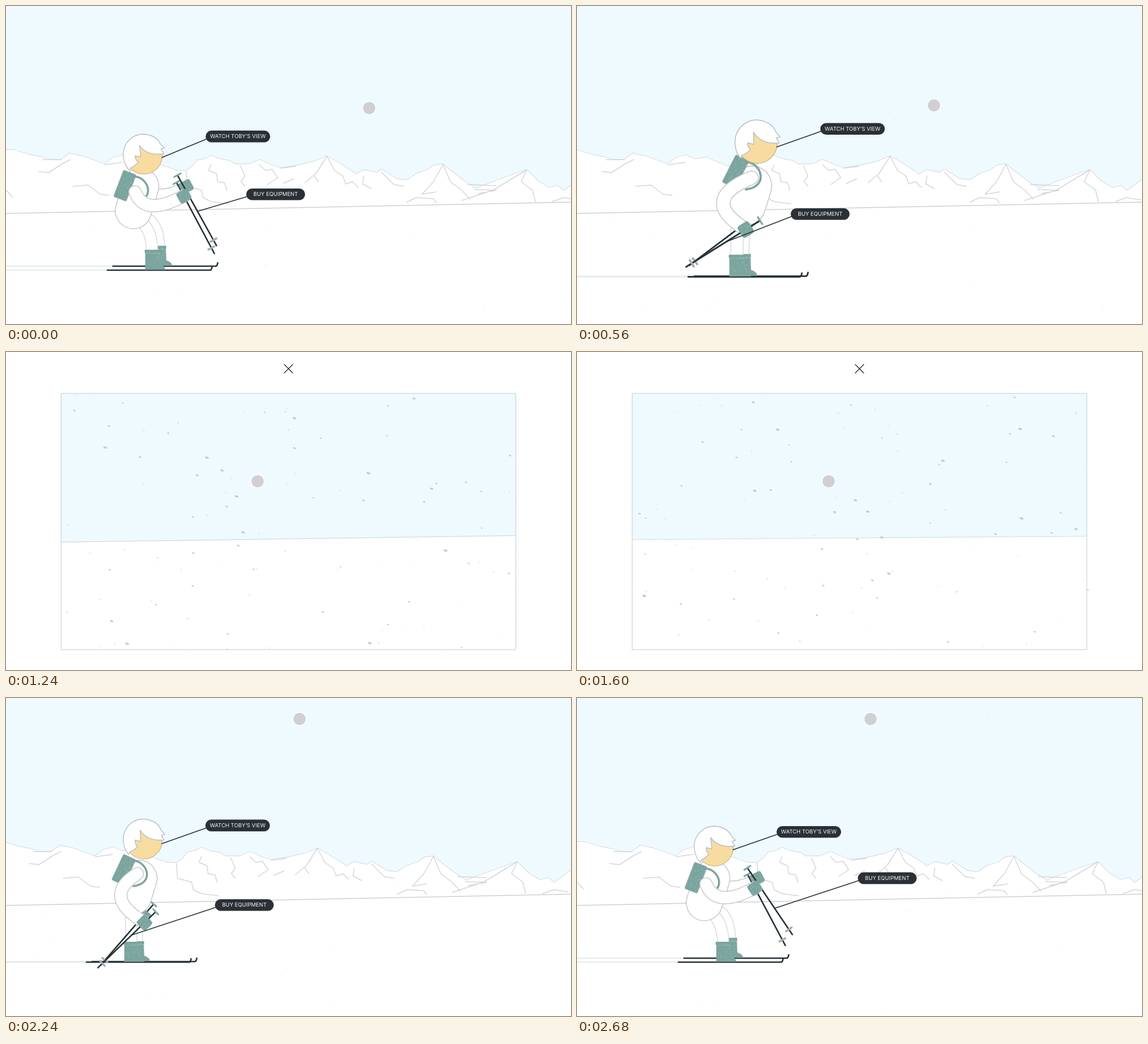
Recreate the animation shown at these times as an HTML page with a canvas. Size 998 by 561 pixels, loop 2720 ms.

```html
<!DOCTYPE html>
<html lang="en">
<head>
<meta charset="utf-8">
<title>Ski trek</title>
<style>
html, body { margin: 0; width: 100%; height: 100%; overflow: hidden; background: #fff; }
canvas { display: block; width: 998px; height: 561px; }
</style>
</head>
<body>
<canvas id="stage" width="998" height="561"></canvas>
<script>
const ctx = document.getElementById('stage').getContext('2d');
const W = 998, H = 561, LOOP = 2720, STRIDE = 1120, TAU = Math.PI * 2, DEG = Math.PI / 180;
const SKY = '#eefaff', INK = '#263238', PILL = '#2b3036', GREEN = '#7ba59f';
const LINE = '#d3d6d8', COAT = '#c6c9cb', SKIN = '#f8dc9f', FLAKE = '#c6cbcc';

// One stride of the skier, sampled at these phases.
const PHASES = [0, 280, 560, 680, 920, 1120];
const STRIDE_TRACKS = {
  crouch: [1, 0, 0, 0, 0, 1],
  headY: [262, 245.5, 247, 249.5, 252, 262],
  headTilt: [-1, 7, 4, 3, -1, 0],
  boot: [258, 207, 210, 221, 225, 258],
  legTop: [234, 207, 210, 220, 226, 234],
  shoulderX: [228, 230, 234, 232, 229, 228],
  shoulderY: [328, 301, 305, 310, 316, 328],
  elbowX: [258, 187, 188, 203, 206, 258],
  elbowY: [352, 344, 344, 352, 357, 352],
  handX: [314, 223, 225, 245, 269, 314],
  handY: [335, 393, 389, 396, 388, 335],
  packX: [210, 206, 208, 208, 207, 210],
  packY: [317, 297, 295, 303, 304, 317],
  packTilt: [21, 30, 27, 25, 24, 21],
  nearPole: [61, 159, 148, 136, 120, 56],
  farPole: [62, 164, 143, 131, 115, 62],
  farX: [0, 1, 0, -2, -3, 0],
  farY: [0, -13, -11, -12, -12, 0],
  tagAt: [46, 46, 38, 32, 30, 59]
};

// Slow drift and zoom of the skier and the lag of the tags, over the loop.
const TIMES = [0, 280, 560, 920, 1300, 2240, 2720];
const LOOP_TRACKS = {
  shift: [0, 54, 75, 15, 0, 0, 0],
  zoom: [1, 1.04, 1.085, 1.085, 1, 1, 1],
  viewX: [77, 85, 77, 77, 77, 77, 77],
  viewY: [-37, -32, -32, -32, -32, -32, -31.5],
  buyX: [86, 140, 114, 140, 147, 147, 147],
  buyY: [-30, -44, -49, -50, -53, -53, -53]
};

const SKYLINE = [-30,250, 0,254, 14,254, 40,262, 60,266, 78,271, 96,272, 112,260, 135,265,
  155,272, 174,279, 188,268, 206,263, 222,270, 243,267, 275,281, 300,290, 318,291, 330,282,
  338,272, 350,270, 362,264, 378,270, 395,273, 404,279, 430,279, 448,271, 470,281, 485,286,
  520,280, 545,274, 567,265, 585,275, 612,292, 618,297, 632,289, 655,294, 663,288, 690,305,
  708,307, 725,296, 745,289, 756,281, 772,279, 785,290, 810,309, 830,322, 850,314, 885,301,
  920,289, 940,309, 960,321, 975,317, 985,326, 1015,304, 1050,285];
const RIDGES = new Path2D(`M58 292L75 294L100 278L114 271M118 318L145 316L166 332L182 334
  M0 325L12 337M65 271L98 271M175 280L205 276M318 292L320 318L345 325L348 338L362 345L392 349
  M362 280L358 290L372 296L374 310L386 312L390 325M414 282L422 300L415 310L422 318
  M448 280L458 290L470 288L480 303L462 315M485 286L512 283M508 305L490 313
  M567 265L548 295L528 312M545 300L552 310M567 265L580 290L595 300L600 314L612 310L622 320
  M632 300L630 314L645 322M663 293L685 315L702 318M772 279L755 310L735 332L760 328
  M772 280L785 310L805 325L820 341M815 315L865 317M828 324L866 325L834 331
  M805 343L860 325L920 289L910 310L930 325L935 345M708 346L725 338L755 340L760 347
  M965 345L985 338L1010 342`);
const HAIR = new Path2D(`M36 -1C22 1 4 0 -7 -16C-6 -6 -5 -1 -5 4L-15 2Q-15 9 -10 13Q-15 20 -23 23
  L-25 28C-33 20 -36 8 -36 -1C-35 -23 -18 -36 0 -36C14 -35 25 -29 30 -18L37 -11L31 -9Z`);

const clamp01 = v => Math.min(1, Math.max(0, v));
const ramp = (t, from, to) => {
  const u = clamp01((t - from) / (to - from));
  return u * u * (3 - 2 * u);
};
const rand = n => {
  const v = Math.sin(n * 127.1 + 11.7) * 43758.5453;
  return v - Math.floor(v);
};
const wrap = (v, size) => ((v % size) + size) % size;
const polar = (x, y, angle, r) => [x + r * Math.cos(angle), y + r * Math.sin(angle)];

// Monotone cubic interpolation: smooth, without overshoot.
function sample(times, values, t) {
  const last = times.length - 2;
  let i = 0;
  while (i < last && t >= times[i + 1]) i++;
  const slope = k => (values[k + 1] - values[k]) / (times[k + 1] - times[k]);
  const tangent = k => {
    if (k === 0) return slope(0);
    if (k > last) return slope(last);
    const a = slope(k - 1), b = slope(k);
    return a * b <= 0 ? 0 : 2 * a * b / (a + b);
  };
  const d = times[i + 1] - times[i], u = clamp01((t - times[i]) / d), v = 1 - u;
  return values[i] * (1 + 2 * u) * v * v + tangent(i) * d * u * v * v
    + values[i + 1] * u * u * (3 - 2 * u) - tangent(i + 1) * d * u * u * v;
}
const sampleAll = (times, tracks, t) =>
  Object.fromEntries(Object.entries(tracks).map(([k, v]) => [k, sample(times, v, t)]));

function stroke(color, width, path) {
  ctx.strokeStyle = color;
  ctx.lineWidth = width;
  path ? ctx.stroke(path) : ctx.stroke();
}
function line(color, width, ...points) {
  ctx.beginPath();
  points.forEach(p => ctx.lineTo(...p));
  stroke(color, width);
}
function tube(a, control, b, width, edge = COAT) {
  ctx.beginPath();
  ctx.moveTo(...a);
  ctx.quadraticCurveTo(...control, ...b);
  stroke(edge, width + 1.5);
  stroke('#fff', width - 1.5);
}
function disc(x, y, r, fill) {
  ctx.beginPath();
  ctx.arc(x, y, r, 0, TAU);
  ctx.fillStyle = fill;
  ctx.fill();
}
function block(x, y, w, h, r, fill = GREEN) {
  ctx.beginPath();
  ctx.roundRect(x, y, w, h, r);
  ctx.fillStyle = fill;
  ctx.fill();
}
function speckle(x, y, w, h, count) {
  ctx.fillStyle = 'rgba(255,255,255,.45)';
  for (let i = 0; i < count; i++) ctx.fillRect(x + rand(i) * w, y + rand(i + 50) * h, 1, 1);
}
function placed(x, y, angle, draw) {
  ctx.save();
  ctx.translate(x, y);
  ctx.rotate(angle);
  draw();
  ctx.restore();
}

function drawLandscape(phase, t) {
  ctx.fillStyle = SKY;
  ctx.fillRect(0, 0, W, H);
  ctx.save();
  ctx.translate(-phase * 0.025, 0);
  ctx.beginPath();
  for (let i = 0; i < SKYLINE.length; i += 2) ctx.lineTo(SKYLINE[i], SKYLINE[i + 1]);
  stroke(LINE, 1.8);
  ctx.lineTo(1050, H);
  ctx.lineTo(-30, H);
  ctx.fillStyle = '#fff';
  ctx.fill();
  stroke(LINE, 1.5, RIDGES);
  ctx.restore();
  ctx.beginPath();
  ctx.moveTo(0, 366);
  ctx.lineTo(W, 346);
  ctx.lineTo(W, H);
  ctx.lineTo(0, H);
  ctx.fillStyle = '#fff';
  ctx.fill();
  line('#cdd1d3', 1.5, [0, 366], [W, 346]);
  for (let i = 0; i < 90; i++) {
    const x = wrap(rand(i) * W - t * (0.04 + rand(i + 300) * 0.08), W);
    const y = wrap(rand(i + 100) * H + t * 0.03, H);
    ctx.fillStyle = i % 5 ? 'rgba(190,200,205,.45)' : 'rgba(255,255,255,.7)';
    ctx.fillRect(x, y, 1 + rand(i + 200), 1);
  }
}

function drawSki(x, y) {
  line('#e3ebed', 1.8, [-300, y], [x - 79, y]);
  line(INK, 2.6, [x - 79, y], [x + 103, y], [x + 105, y - 2], [x + 106, y - 6]);
}
function drawBoot(x, y) {
  ctx.beginPath();
  ctx.moveTo(x - 12, y - 34);
  ctx.lineTo(x + 12, y - 34);
  ctx.lineTo(x + 13, y - 10);
  ctx.quadraticCurveTo(x + 23, y - 7, x + 23, y - 1);
  ctx.lineTo(x - 12, y - 1);
  ctx.fillStyle = GREEN;
  ctx.fill();
  stroke('#9aa9a7', 0.7);
  block(x - 13, y - 36, 26, 6, 1);
  line('#9fb5b1', 0.8, [x - 12, y - 30], [x + 12, y - 30]);
  speckle(x - 11, y - 34, 22, 31, 18);
}
function drawPole(x, y, angle) {
  const cross = (r, half, color, width) => {
    const c = polar(x, y, angle, r);
    line(color, width, polar(...c, angle + Math.PI / 2, half), polar(...c, angle - Math.PI / 2, half));
  };
  line(INK, 2.6, polar(x, y, angle, -26), polar(x, y, angle, 115));
  cross(-27, 6.5, GREEN, 3);
  cross(104, 6, '#a7adaf', 3.6);
}
function drawGlove(x, y, angle) {
  placed(x, y, angle, () => {
    block(-10, -11, 21, 22, 4);
    speckle(-8, -9, 17, 18, 12);
  });
}

function drawHead(y, tilt) {
  placed(243, y, tilt, () => {
    disc(0.5, 2, 32.5, SKIN);
    stroke('#b9ab8a', 1);
    ctx.fillStyle = '#fff';
    ctx.fill(HAIR);
    stroke('#b9bdbf', 1.4, HAIR);
  });
}

function drawSkier(p) {
  const c = p.crouch, ground = 466, farGround = ground - 1 - 6 * c;
  const hand = [p.handX, p.handY];
  const nearAngle = p.nearPole * DEG, farAngle = p.farPole * DEG;
  const farBoot = p.boot + 10 + 2 * c;
  const farHand = [p.handX + p.farX + 4 * c, p.handY + p.farY - 17 * c];

  drawSki(p.boot + 10, farGround);
  tube([p.legTop + 13, 372], [farBoot + 2, 388], [farBoot, farGround - 32], 19, '#d9dddd');
  drawBoot(farBoot, farGround);
  drawSki(p.boot, ground);
  tube([p.legTop, 375], [p.boot + 1, 395], [p.boot, ground - 32], 20, '#d9dddd');
  drawBoot(p.boot, ground);

  if (c > 0.05) tube([248, 325], [275, 342], farHand, 18);
  drawPole(p.handX + p.farX, p.handY + p.farY, farAngle);
  drawGlove(...farHand, farAngle);

  const chest = [235 + 3 * c, 318], hip = [225, 350 + 11 * c];
  tube(chest, [(chest[0] + hip[0]) / 2, (chest[1] + hip[1]) / 2], hip, 64);

  placed(p.packX, p.packY, p.packTilt * DEG, () => {
    block(-12, -25, 24, 50, 2);
    stroke('#a3b3b0', 0.8);
    speckle(-10, -23, 20, 46, 30);
  });
  placed(p.packX, p.packY, 0, () => {
    ctx.beginPath();
    ctx.moveTo(18, -16);
    ctx.bezierCurveTo(42, -14, 55, 24, 17, 29);
    stroke(GREEN, 3.6);
  });

  const bend = [2 * p.elbowX - (p.shoulderX + p.handX) / 2, 2 * p.elbowY - (p.shoulderY + p.handY) / 2];
  tube([p.shoulderX, p.shoulderY], bend, hand, 22);
  drawHead(p.headY, p.headTilt * DEG);
  drawPole(p.handX + 2 * c, p.handY - 13 * c, nearAngle);
  drawGlove(...hand, nearAngle);
}

function drawTag(text, anchor, dx, dy, width) {
  const x = anchor[0] + dx, y = anchor[1] + dy;
  line(INK, 1.6, anchor, [x + 5, y + 3]);
  block(x, y - 10.3, width, 20.6, 10.3, PILL);
  ctx.fillStyle = '#f4f7f7';
  ctx.fillText(text, x + width / 2, y + 0.3);
}

function drawScene(t) {
  const phase = Math.min(t < 1560 ? t : t - 1560, STRIDE);
  const p = sampleAll(PHASES, STRIDE_TRACKS, phase);
  const s = sampleAll(TIMES, LOOP_TRACKS, t);
  const toStage = (x, y) => [243 + s.shift + (x - 243) * s.zoom, 328 + (y - 328) * s.zoom];

  drawLandscape(phase % STRIDE, t);
  ctx.save();
  ctx.translate(...toStage(0, 0));
  ctx.scale(s.zoom, s.zoom);
  drawSkier(p);
  ctx.restore();

  const face = polar(243, p.headY, (p.headTilt + 10) * DEG, 33);
  const grip = polar(p.handX + 2 * p.crouch, p.handY - 13 * p.crouch, p.nearPole * DEG, p.tagAt);
  drawTag('WATCH TOBY’S VIEW', toStage(...face), s.viewX, s.viewY, 114);
  drawTag('BUY EQUIPMENT', toStage(...grip), s.buyX, s.buyY, 104);
}

function drawView(t, alpha) {
  if (alpha <= 0) return;
  const swing = Math.cos((t - 920) / 680 * Math.PI);
  const mid = 329.5 + 1.5 * swing, tilt = 5.5 + 2.5 * swing;
  ctx.save();
  ctx.globalAlpha = alpha;
  ctx.translate(0, (1 - alpha) * 4);
  ctx.fillStyle = '#fff';
  ctx.fillRect(0, 0, W, H);
  ctx.beginPath();
  ctx.moveTo(97.5, 73);
  ctx.lineTo(900.5, 73);
  ctx.lineTo(900.5, mid - tilt);
  ctx.lineTo(97.5, mid + tilt);
  ctx.fillStyle = SKY;
  ctx.fill();
  line('#cfdbdd', 1.2, [97.5, mid + tilt], [900.5, mid - tilt]);
  ctx.strokeStyle = '#d3dede';
  ctx.lineWidth = 1.6;
  ctx.strokeRect(97.5, 73, 803, 452);

  for (let i = 0; i < 600; i++) {
    const size = 0.5 + 2.5 * Math.pow(rand(i + 2000), 14);
    const speed = 0.05 + size * 0.12;
    const x = 100 + wrap(rand(i) * 803 + t * speed, 803);
    const y = 75 + wrap(rand(i + 1000) * 455 + t * speed * 0.55, 455);
    ctx.beginPath();
    ctx.ellipse(x, y, size * 1.2, size * 0.65, 0.3, 0, TAU);
    ctx.fillStyle = size > 0.75 ? FLAKE : '#dbe2e3';
    ctx.fill();
  }
  line(INK, 1.4, [491.5, 22], [506.5, 37]);
  line(INK, 1.4, [506.5, 22], [491.5, 37]);
  ctx.restore();
}

function drawCursor(t) {
  const a = ramp(t, 520, 800), b = ramp(t, 1680, 1920);
  const x = 641.5 - 197 * a + 74 * b;
  const y = 180 + 48 * a - 45 * Math.sin(Math.PI * a) * (1 - a) - 191 * b;
  disc(x, y, 12.2, '#fff');
  disc(x, y, 10.8, '#cfd0d1');
}

function render(now) {
  const t = Math.floor(wrap(now, LOOP) / 40) * 40;
  ctx.lineCap = ctx.lineJoin = 'round';
  ctx.font = '9.5px Inter, Roboto, sans-serif';
  ctx.textAlign = 'center';
  ctx.textBaseline = 'middle';
  drawScene(t);
  drawView(t, ramp(t, 760, 1040) * (1 - ramp(t, 1920, 2180)));
  drawCursor(t);
}

let start;
function tick(now) {
  start ??= now;
  render(now - start);
  requestAnimationFrame(tick);
}
render(0);
requestAnimationFrame(tick);
</script>
</body>
</html>
```
